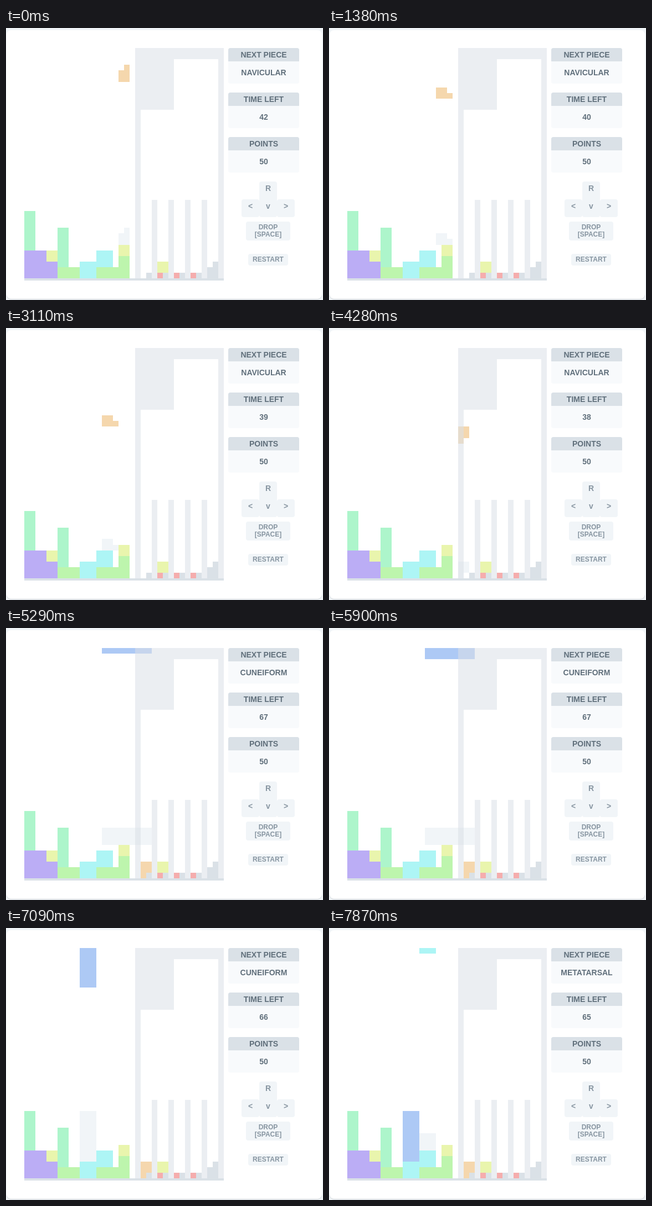
Recreate the animation shown at these times as an HTML page. Size 572 by 489 pixels, loop 8000 ms.

```html
<!DOCTYPE html>
<html lang="en">
<head>
<meta charset="utf-8">
<title>Falling blocks</title>
<style>
html, body { margin: 0; width: 100%; height: 100%; overflow: hidden; background: #f1f5f8; }
svg { display: block; width: 572px; height: 489px; }
text { font: bold 14px "Liberation Sans", Arial, sans-serif; fill: #606f7b; text-anchor: middle; }
.keys text { fill: #8795a1; }
.keys .small { font-size: 12px; }
.keys rect { fill: #f1f5f8; }
.field { shape-rendering: crispEdges; }
</style>
</head>
<body>
<svg viewBox="0 0 572 489">
  <rect x="1" y="8" width="569" height="480" rx="8" fill="#cdd2d6"/>
  <rect x="1" y="4" width="569" height="483" rx="8" fill="#fff"/>
  <clipPath id="well"><rect x="33" y="36" width="360" height="418"/></clipPath>
  <g class="field" clip-path="url(#well)">
    <g id="blocks"></g>
    <g id="ghost"></g>
    <g id="active"></g>
    <g id="mold"></g>
    <rect x="33" y="450" width="360" height="4" fill="#dae1e7"/>
  </g>
  <g id="panels"></g>
  <g class="keys">
    <rect x="457" y="276" width="32" height="36" rx="4"/>
    <rect x="425" y="308" width="32" height="32" rx="4"/>
    <rect x="457" y="308" width="32" height="32" rx="4"/>
    <rect x="489" y="308" width="32" height="32" rx="4"/>
    <rect x="433" y="348" width="80" height="34" rx="4"/>
    <rect x="437" y="406" width="72" height="21" rx="4"/>
    <text x="473" y="293">R</text>
    <text x="441" y="325">&lt;</text>
    <text x="473" y="325">v</text>
    <text x="505" y="325">&gt;</text>
    <text class="small" x="473" y="362">DROP</text>
    <text class="small" x="473" y="375">[SPACE]</text>
    <text class="small" x="473" y="420">RESTART</text>
  </g>
</svg>
<script>
const LOOP = 8000, FLOOR = 41;
const $ = id => document.getElementById(id);
const mint = '#adf5cb', purple = '#bbadf5', yellow = '#e9f5ad', cyan = '#adf5f5',
  green = '#bdf5ad', pink = '#f5adad', orange = '#f5d7ad', blue = '#adc9f5', grey = '#dae1e7';

// Cells are [column, row, width, height]
const rect = ([c, r, w, h], fill, extra = '') => {
  const y = Math.round(36 + r * 10.1), end = Math.round(36 + (r + h) * 10.1);
  return `<rect x="${33 + c * 10}" y="${y}" width="${w * 10}" height="${end - y}" fill="${fill}" ${extra}/>`;
};

const shapes = {
  up: { fill: orange, cells: [[0, 1, 1, 2], [1, 0, 1, 3]] },
  flat: { fill: orange, cells: [[0, 0, 2, 2], [2, 1, 1, 1]] },
  down: { fill: orange, cells: [[0, 0, 1, 3], [1, 0, 1, 2]] },
  wide: { fill: blue, cells: [[0, 0, 9, 3]] },
  tall: { fill: blue, cells: [[0, 0, 3, 9]] },
  square: { fill: cyan, cells: [[0, 0, 3, 3]] }
};

const pile = [
  [mint, 0, 29, 2, 7], [purple, 0, 36, 4, 2], [purple, 0, 38, 6, 3], [yellow, 4, 36, 2, 2],
  [mint, 6, 32, 2, 7], [green, 6, 39, 4, 2], [cyan, 10, 38, 3, 3], [cyan, 13, 36, 3, 3],
  [green, 13, 39, 4, 2], [green, 17, 37, 2, 4], [yellow, 17, 35, 2, 2], [yellow, 24, 38, 2, 2],
  [grey, 22, 40, 1, 1], [grey, 33, 39, 1, 2], [grey, 34, 38, 1, 3]
].map(([fill, ...cell]) => ({ fill, cell }));
for (const c of [24, 27, 30]) {
  pile.push({ fill: pink, cell: [c, 40, 1, 1] }, { fill: grey, cell: [c + 1, 40, 1, 1] });
}

// time, shape, column, row; DROP sends the piece to its landing row
const DROP = null;
const moves = [
  [0, 'up', 17, 3], [300, 'up', 17, 4], [850, 'up', 17, 5], [1000, 'flat', 16, 6],
  [1380, 'flat', 16, 7], [1620, 'flat', 16, 8], [1860, 'flat', 16, 9],
  [2120, 'flat', 16, 10], [2400, 'flat', 16, 11], [2700, 'flat', 15, 11],
  [2940, 'flat', 15, 12], [3110, 'flat', 14, 12], [3410, 'flat', 14, 13],
  [3550, 'down', 15, 12], [3690, 'down', 16, 12], [3830, 'down', 17, 13],
  [3960, 'down', 18, 13], [4120, 'down', 19, 13], [4280, 'down', 20, 14],
  [4450, 'down', 20, 15], [4600, 'down', 21, 15], [4830, 'down', 21, DROP],
  [5290, 'wide', 14, -2], [5800, 'wide', 14, -1], [5950, 'tall', 17, -4],
  [6120, 'tall', 16, -4], [6300, 'tall', 16, -3], [6450, 'tall', 15, -3],
  [6580, 'tall', 14, -3], [6700, 'tall', 13, -3], [6810, 'tall', 12, -2],
  [6950, 'tall', 11, -2], [7080, 'tall', 10, -2], [7320, 'tall', 10, -1],
  [7550, 'tall', 10, DROP], [7870, 'square', 13, -2]
];
const clock = [[0, 42], [300, 41], [1380, 40], [2400, 39], [3410, 38],
  [4830, 68], [5290, 67], [6300, 66], [7320, 65]];
const names = [[0, 'NAVICULAR'], [5290, 'CUNEIFORM'], [7870, 'METATARSAL']];

const at = (list, t) => list.filter(e => e[0] <= t).pop();
const place = (shape, col, row) => shapes[shape].cells.map(([c, r, w, h]) => [c + col, r + row, w, h]);
const hit = (a, b) => a[0] < b[0] + b[2] && b[0] < a[0] + a[2] && a[1] < b[1] + b[3] && b[1] < a[1] + a[3];

function landing(shape, col, row, blocks) {
  const blocked = cell => cell[1] + cell[3] > FLOOR || blocks.some(b => hit(cell, b.cell));
  while (!place(shape, col, row + 1).some(blocked)) row++;
  return row;
}

// Resolve every state once, adding dropped pieces to the pile
let blocks = pile, last = -2;
const states = moves.map(([t, shape, col, row]) => {
  const fill = shapes[shape].fill;
  if (row === DROP) {
    const cells = place(shape, col, landing(shape, col, last, blocks));
    blocks = blocks.concat(cells.map(cell => ({ fill, cell })));
    return [t, { blocks, active: [], ghost: [], fill }];
  }
  last = row;
  return [t, {
    blocks, fill,
    active: place(shape, col, row),
    ghost: place(shape, col, landing(shape, col, row, blocks))
  }];
});

$('mold').innerHTML = [
  [20, 0, 16, 2], [20, 2, 7, 9], [20, 11, 1, 30], [35, 2, 1, 39],
  ...[23, 26, 29, 32].map(c => [c, 27, 1, 14])
].map(c => rect(c, grey, 'fill-opacity=".55"')).join('');

$('panels').innerHTML = [['NEXT PIECE', 'name'], ['TIME LEFT', 'time'], ['POINTS', 'points']]
  .map(([title, id], i) => `<g transform="translate(401 ${36 + i * 80})">
    <rect width="128" height="64" rx="4" fill="#f8fafc"/>
    <path d="M0 24V4Q0 0 4 0H124Q128 0 128 4V24Z" fill="${grey}"/>
    <text x="64" y="17">${title}</text><text x="64" y="49" id="${id}"></text></g>`).join('');
$('points').textContent = 50;

let shown;
function draw(now) {
  const t = now % LOOP;
  const s = at(states, t)[1];
  if (s !== shown) {
    shown = s;
    $('blocks').innerHTML = s.blocks.map(b => rect(b.cell, b.fill)).join('');
    $('ghost').innerHTML = s.ghost.map(c => rect(c, '#f1f5f8')).join('');
    $('active').innerHTML = s.active.map(c => rect(c, s.fill)).join('');
  }
  $('name').textContent = at(names, t)[1];
  $('time').textContent = at(clock, t)[1];
}

const start = performance.now();
function tick() {
  draw(performance.now() - start);
  requestAnimationFrame(tick);
}
tick();
</script>
</body>
</html>
```
